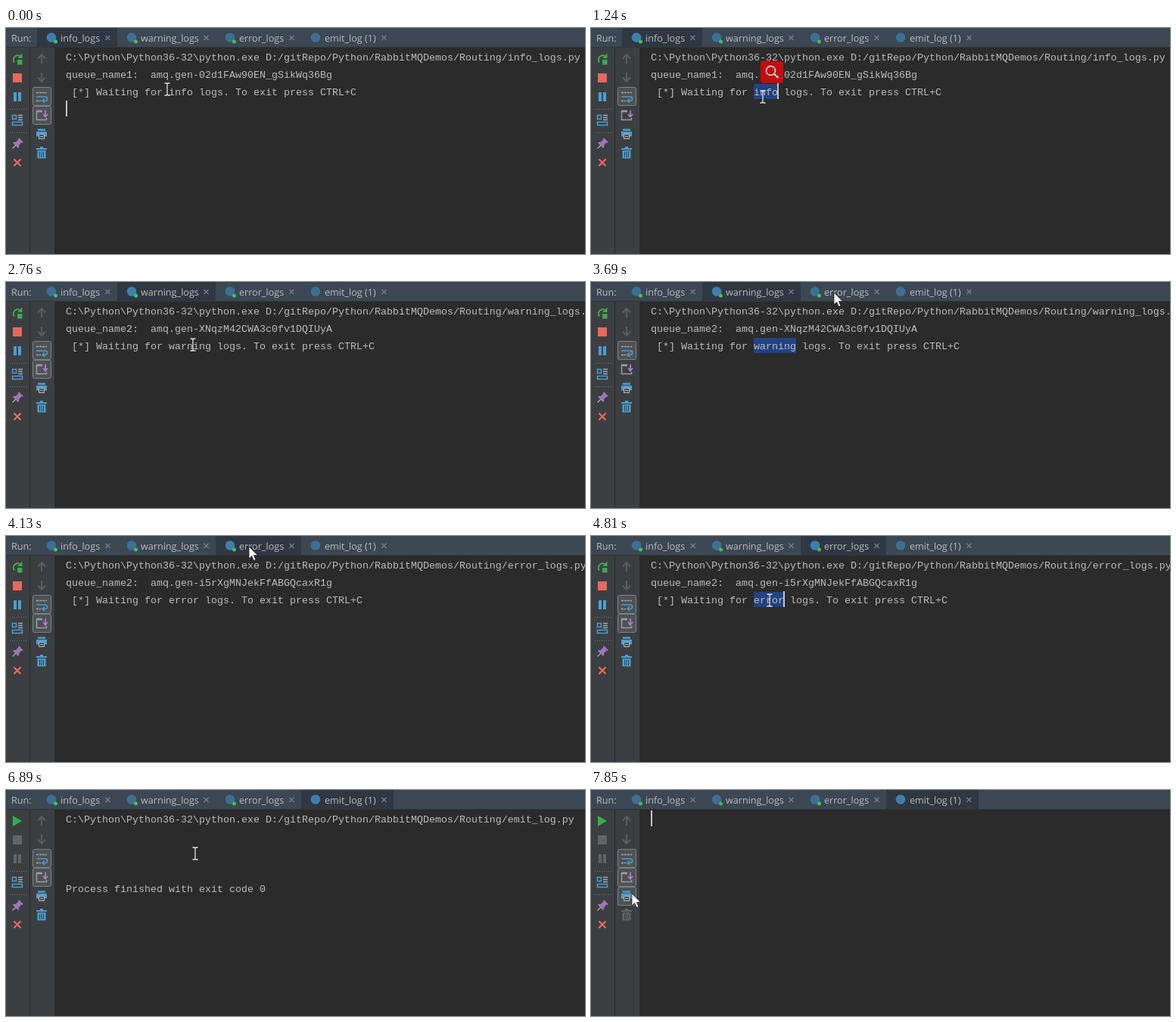
Animation, 765 px wide and 299 px high, one loop 8000 ms. Source, as an HTML page:

```html
<!DOCTYPE html>
<html lang="en">
<head>
<meta charset="utf-8">
<title>Run console</title>
<style>
html, body { margin: 0; width: 100%; height: 100%; overflow: hidden; background: #2b2b2b; }
svg { display: block; width: 765px; height: 299px; }
text { white-space: pre; fill: #bbb; }
.tab text, .run { font: 12.6px "Open Sans", "Noto Sans", sans-serif; text-rendering: geometricPrecision; }
.con text { font: 13.333px "Liberation Mono", monospace; }
.line { fill: none; stroke-width: 1.5; }
.hide { display: none; }
</style>
</head>
<body>
<svg viewBox="0 0 765 299" xmlns="http://www.w3.org/2000/svg">
  <rect width="765" height="299" fill="#2b2b2b"/>
  <rect width="765" height="25" fill="#3c4754"/>
  <g id="tabs"></g>
  <rect y="25" width="765" height="1" fill="#323437"/>
  <text class="run" x="7" y="17.5">Run:</text>

  <rect y="26" width="64" height="273" fill="#3c3f41"/>
  <path d="M31.5 26V299" stroke="#2b2b2b"/>
  <path d="M5 107.5H28M5 138.5H28" stroke="#707375" stroke-dasharray="1 2"/>

  <g id="live">
    <path d="M20 38.5A5.6 5.6 0 1 0 11 45.5" class="line" stroke="#3fa652" style="stroke-width:2"/>
    <path d="M21.5 33.5V40H15Z" fill="#3fa652"/>
    <rect x="15" y="42" width="6.500" height="6.500" fill="#3fa652"/>
    <rect x="9" y="60" width="12" height="12" fill="#e5695e"/>
    <path d="M10 85h4v12h-4zM16 85h4v12h-4z" fill="#4a9dd0"/>
  </g>
  <g id="idle">
    <path d="M9 34L21 41L9 48Z" fill="#2fb14c"/>
    <path d="M9 60h12v12h-12zM10 85h4v12h-4zM16 85h4v12h-4z" fill="#616365"/>
  </g>

  <g class="line">
    <path d="M8.500 115.500h5v5h-5zM8.500 124.500h13v4h-13z" stroke="#4a9dd0"/>
    <path d="M16 115.500h6M16 118.500h6M16 121.500h6" stroke="#a4a8aa"/>
  </g>
  <g transform="translate(15 153) rotate(45)" fill="#a074b8">
    <path d="M-4-7H4V-5H3V0L5 2V3.500H-5V2L-3 0V-5H-4Z"/>
    <rect x="-.6" y="3" width="1.300" height="6" fill="#b4b6b8"/>
  </g>
  <path d="M10.500 173.500l9 9m0-9l-9 9" stroke="#e5695e" stroke-width="2.300"/>

  <path d="M47 35V47M42 40.500L47 35L52 40.500M47 59V71M42 65.500L47 71L52 65.500" class="line" stroke="#595c5e" style="stroke-width:2"/>
  <g id="boxes" fill="#4e5254" stroke="#7e8183"></g>
  <g class="line">
    <path d="M40 85.500H54M40 96.500H46" stroke="#a4a8aa" stroke-dasharray="3 1"/>
    <path d="M40 91H52Q54.500 91 54.500 93.700T52 96.500H48.500M51 93.500L48 96.500L51 99" stroke="#4a9dd0"/>
    <path d="M48 110.500H40.500V121.500H53.500V119" stroke="#9a9da0"/>
    <path d="M40 110H48" stroke="#9a9da0" style="stroke-width:2.500"/>
    <path d="M52 109V117M49 114L52 117.500L55 114" stroke="#b07cc9" style="stroke-width:1.800"/>
  </g>
  <path d="M42 133.500H52V136H42ZM40 137H54V143.500H51V140H43V143.500H40Z" fill="#4a9dd0"/>
  <path d="M43.500 140.500H50.500V146.500H43.500ZM45 143.500H49" fill="#4a4d4f" stroke="#b4b6b8"/>
  <g id="trash">
    <path d="M45 157H49V159H54V161H40V159H45ZM41.500 162H52.500V172.500H41.500Z"/>
    <path d="M44.500 163.500V171M47 163.500V171M49.500 163.500V171" stroke="#3c3f41"/>
  </g>

  <rect id="sel" x="215" y="74" height="20" fill="#214283"/>
  <g id="con" class="con"></g>
  <rect id="caret" width="2" height="21" fill="#c4c4c4"/>
  <g id="lens">
    <rect x="-15" y="-14.500" width="30" height="29.500" rx="4" fill="#c20c0c"/>
    <circle cx="-1.500" cy="-1.500" r="6" class="line" stroke="#f6eaea"/>
    <path d="M3 3L8.500 8" stroke="#f6eaea" stroke-width="2.200"/>
  </g>
  <path id="arrow" d="M0 0V16L3.700 12.600L6.300 18.500L8.900 17.400L6.400 11.600H11.500Z" fill="#fff" stroke="#222" stroke-width=".8"/>
  <path id="beam" d="M-3.500-8H-1L0-7L1-8H3.500M0-7V7M-3.500 8H-1L0 7L1 8H3.500" fill="none" stroke="#e4e4e4" stroke-width="1.300"/>
</svg>
<script>
const LOOP = 8000, FIRST = 116, STEP = 138;
const CHAR = 8, ROW = 23, LEFT = 79;
const WORD = LEFT + ' [*] Waiting for '.length * CHAR;
const CLEAR = 7700;

const $ = id => document.getElementById(id);
const show = (id, on) => $(id).classList.toggle('hide', !on);
const place = (id, x, y) => $(id).setAttribute('transform', `translate(${x} ${y})`);

const NAMES = ['info_logs', 'warning_logs', 'error_logs', 'emit_log (1)'];
const EDGES = [41, 147, 277, 390, 512];

// Each visit opens a tab, then double-clicks the log kind
const VISITS = [
  { open: 0, pick: 970, kind: 'info', queue: '02d1FAw90EN_gSikWq36Bg' },
  { open: 1790, pick: 2910, kind: 'warning', queue: 'XNqzM42CWA3c0fv1DQIUyA' },
  { open: 3990, pick: 4800, kind: 'error', queue: 'i5rXgMNJekFfABGQcaxR1g' },
  { open: 5940 }
];

// Pointer stops: arrive, leave, x, y
const STOPS = [
  [0, 110, 213, 81], [830, 1370, 227, 91], [1650, 2200, 212, 15],
  [2735, 3280, 247, 83], [3560, 4370, 321, 14], [4800, 4950, 236, 85],
  [5630, 6360, 434, 12], [7430, CLEAR, 47, 164], [7840, LOOP, 54, 137]
];

function pointer(t) {
  const i = STOPS.findLastIndex(s => s[0] <= t);
  const [, leave, x, y] = STOPS[i];
  if (t <= leave) return [x, y];
  const [arrive, , nx, ny] = STOPS[i + 1];
  const k = (t - leave) / (arrive - leave), e = k * k * (3 - 2 * k);
  return [Math.round(x + (nx - x) * e), Math.round(y + (ny - y) * e)];
}

const command = name =>
  `C:\\Python\\Python36-32\\python.exe D:/gitRepo/Python/RabbitMQDemos/Routing/${name}.py`;

const output = ({ kind, queue }, i) => kind ? [
  command(kind + '_logs'),
  `queue_name${Math.min(i + 1, 2)}:  amq.gen-${queue}`,
  ` [*] Waiting for ${kind} logs. To exit press CTRL+C`
] : [command('emit_log'), '', '', '', 'Process finished with exit code 0'];

$('tabs').innerHTML = NAMES.map((name, i) => {
  const l = EDGES[i], r = EDGES[i + 1];
  return `<g class="tab">
    <rect x="${l}" width="${r - l}" height="25"/>
    <circle cx="${l + 19}" cy="12.5" r="6.3" fill="#3f7fae"/>
    ${VISITS[i].kind ? `<circle cx="${l + 24.5}" cy="18" r="2.5" fill="#3fc24d"/>` : ''}
    <text x="${l + 31}" y="17.5">${name}</text>
    <path d="M${r - 15.5} 10l6 6m0-6l-6 6" stroke="#74808b" stroke-width="1.2"/>
  </g>`;
}).join('');
const tabs = [...$('tabs').children];

$('con').innerHTML = VISITS.map((v, i) => '<g>' + output(v, i).map((s, row) =>
  `<text x="${LEFT}" y="${43 + ROW * row}">${s}</text>`).join('') + '</g>').join('');
const pages = [...$('con').children];

// Button frames: wrap, scroll to end, print, clear
const BUTTONS = ['wrap', 'scroll', 'print', 'clear'];
const buttonTop = i => 78 + 25 * i;
$('boxes').innerHTML = BUTTONS.map((id, i) =>
  `<rect id="${id}" x="35.5" y="${buttonTop(i) + .5}" width="24" height="24" rx="2"/>`).join('');

function draw(t) {
  const tab = VISITS.findLastIndex(v => v.open <= t);
  const { pick = Infinity, kind = '' } = VISITS[tab];
  const since = t - pick, cleared = t >= CLEAR;
  const [x, y] = pointer(t);

  tabs.forEach((g, i) => {
    g.children[0].setAttribute('fill', i === tab ? '#2f3842' : '#3c4754');
    g.children[1].setAttribute('opacity', i === tab ? 1 : .7);
  });
  pages.forEach((g, i) => g.classList.toggle('hide', i !== tab || cleared));
  show('live', kind);
  show('idle', !kind);
  $('trash').setAttribute('fill', cleared ? '#616365' : '#4a9dd0');

  const pressed = ['wrap', since < 130 && 'scroll'];
  BUTTONS.forEach((id, i) => {
    const hover = x >= 35 && x < 60 && y >= buttonTop(i) && y < buttonTop(i + 1);
    show(id, hover || pressed.includes(id));
  });

  const picked = since >= 0, end = WORD + kind.length * CHAR;
  show('sel', picked);
  $('sel').setAttribute('width', kind.length * CHAR);

  show('lens', since >= 240 && since < 500);
  if (picked) {
    const [px, py] = pointer(pick);
    place('lens', px + 12, py - 33);
  }

  show('caret', t < 500 || cleared || picked && since < 500);
  const row = cleared ? 0 : picked ? 2 : 3;
  place('caret', picked ? end - 1 : LEFT, 27 + ROW * row);

  const overText = x >= 64 && y >= 26;
  show('beam', overText);
  show('arrow', !overText);
  place(overText ? 'beam' : 'arrow', x, y);
}

function tick() {
  const t = performance.now() % LOOP;
  draw(t < FIRST ? 0 : FIRST + Math.floor((t - FIRST) / STEP) * STEP);
  requestAnimationFrame(tick);
}
tick();
</script>
</body>
</html>
```
